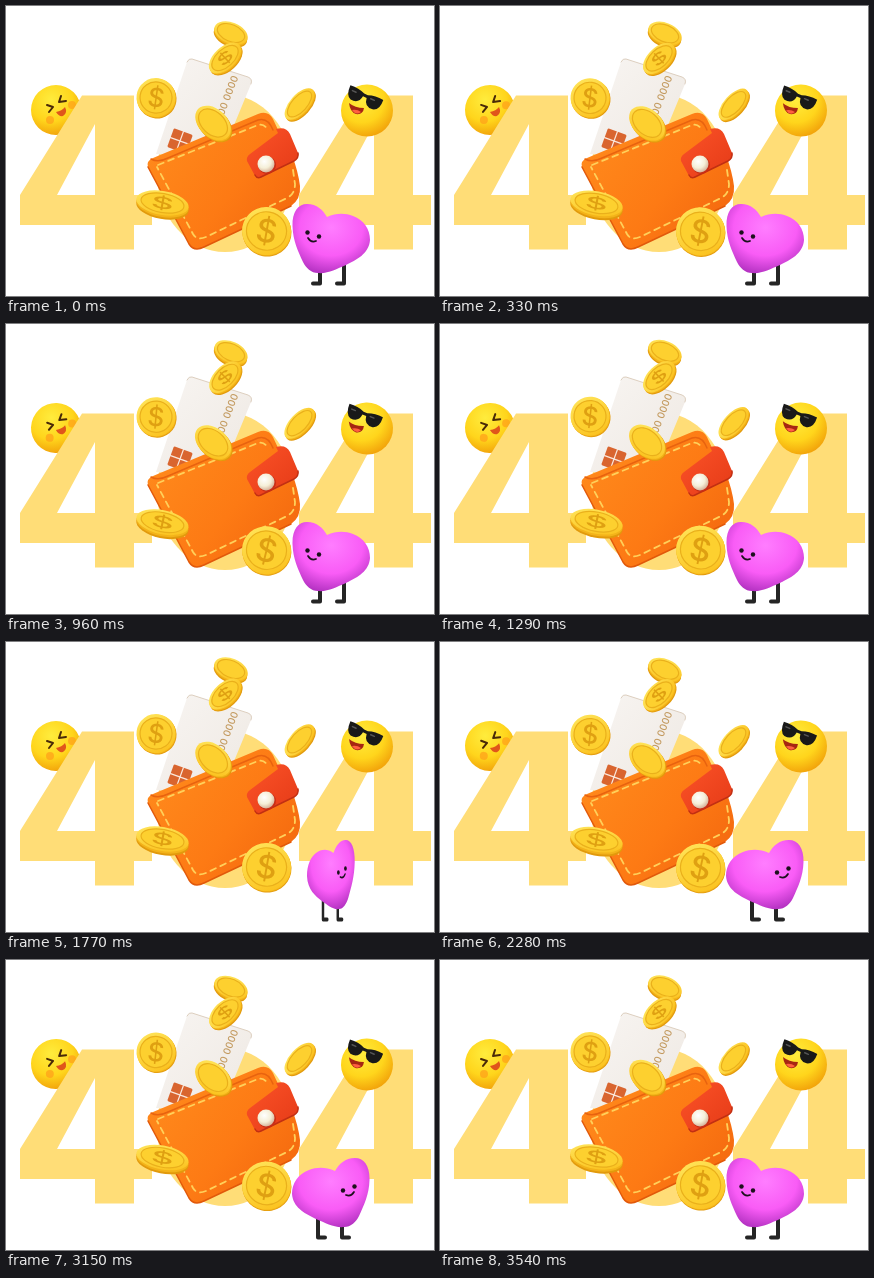
Animation of 428x290 px, one loop 3.57 s. Source, as an HTML page:

```html
<!DOCTYPE html>
<html lang="en">
<head>
<meta charset="utf-8">
<title>404</title>
<style>
html, body { margin: 0; width: 100%; height: 100%; overflow: hidden; background: #fff; }
svg { display: block; width: 428px; height: 290px; }
text { font-family: Inter, Arial, sans-serif; }
</style>
</head>
<body>
<svg viewBox="0 0 428 290" fill="none" stroke-linecap="round" stroke-linejoin="round">
  <defs>
    <radialGradient id="skin" cx=".4" cy=".3" r=".72">
      <stop offset="0" stop-color="#ffec3d"/><stop offset=".6" stop-color="#ffd51c"/><stop offset="1" stop-color="#f2a30a"/>
    </radialGradient>
    <linearGradient id="gold" x1=".1" y1="0" x2=".8" y2="1">
      <stop offset="0" stop-color="#ffe65c"/><stop offset="1" stop-color="#fbc11d"/>
    </linearGradient>
    <linearGradient id="leather" x1="0" y1=".2" x2="1" y2=".9">
      <stop offset="0" stop-color="#ff8a1c"/><stop offset=".55" stop-color="#fd7a14"/><stop offset="1" stop-color="#f2660e"/>
    </linearGradient>
    <linearGradient id="strap" x1="0" y1="0" x2="1" y2="1">
      <stop offset="0" stop-color="#fb5328"/><stop offset="1" stop-color="#e53a17"/>
    </linearGradient>
    <linearGradient id="card" x1="0" y1="0" x2="1" y2="1">
      <stop offset="0" stop-color="#f8f5f2"/><stop offset="1" stop-color="#eee8e2"/>
    </linearGradient>
    <radialGradient id="pink" cx=".5" cy=".34" r=".68">
      <stop offset="0" stop-color="#ff7dff"/><stop offset=".6" stop-color="#f95cf6"/><stop offset="1" stop-color="#b432c2"/>
    </radialGradient>
    <radialGradient id="pearl" cx=".4" cy=".35" r=".65">
      <stop offset="0" stop-color="#fff"/><stop offset=".6" stop-color="#f5efd8"/><stop offset="1" stop-color="#d7b59d"/>
    </radialGradient>
    <path id="four" d="M76 89.5H128V189H146V219H128V243.5H89V219H14V189ZM89 118L51 189H89Z" fill-rule="evenodd"/>
  </defs>

  <g class="sway" data-at="50 104" data-turn="2">
    <circle cx="50" cy="104" r="25" fill="url(#skin)"/>
    <g fill="#ffa21a" opacity=".75"><circle cx="44" cy="114" r="4"/><circle cx="66" cy="99" r="4"/></g>
    <path d="M41 99L47 101L43 106M55 90L53 96L60 95" stroke="#4a2a08" stroke-width="2"/>
    <path d="M50 106Q56 105 59 101Q62 107 57 110Q53 111 50 106Z" fill="#e0561b"/>
  </g>

  <g fill="#ffdd77">
    <use href="#four"/>
    <use href="#four" x="279"/>
    <ellipse cx="219" cy="167" rx="68" ry="79"/>
  </g>

  <g class="sway" data-at="361 105" data-turn="-2">
    <circle cx="361" cy="104.5" r="26" fill="url(#skin)"/>
    <path d="M343 97Q349 102 358 102Q357 109 350 108Q344 106 343 97Z" fill="#a62612"/>
    <path d="M346 104Q351 103 355 106Q350 110 346 104Z" fill="#ff6040"/>
    <g transform="translate(358 93) rotate(24)">
      <path d="M-18-7Q-9-8-2-5H2Q9-8 18-7Q19 4 12 6Q3 7 2-2H-2Q-3 7-12 6Q-18 4-18-7Z" fill="#191919"/>
      <path d="M-14-3H-10M6-3H10" stroke="#555" stroke-width="1.5"/>
    </g>
  </g>

  <!-- card and wallet -->
  <path d="M186 53L242 71Q247 73 245 78L214 153L150 148L181 56Q183 52 186 53Z" fill="url(#card)"/>
  <path d="M181 56Q183 52 186 53L242 71Q247 73 245 78" stroke="#ddcfbf"/>
  <g transform="translate(174 135) rotate(20)">
    <rect x="-10" y="-10" width="20" height="20" rx="1.5" fill="#d9652f"/>
    <path d="M0-10V10M-10 0H10" stroke="#fae7db" stroke-width="1.3"/>
  </g>
  <text transform="translate(213 122) rotate(-69)" font-size="10" font-weight="500" fill="#c39a5f">0000 0000</text>
  <path d="M147 152L252 108Q262 104 267 113L273 126Q290 150 294 180Q295 193 285 200L198 241Q188 246 183 238L142 161Q140 155 147 152Z" fill="url(#leather)"/>
  <path d="M142 161L183 238Q188 246 198 241L285 200" stroke="#e2590a" stroke-width="1.5"/>
  <path d="M145 153Q152 157 162 152L252 114Q262 111 267 124" stroke="#e8630f" stroke-width="1.5"/>
  <path d="M152 159L252 119Q259 117 262 125M287 164L289 178Q289 188 281 192L200 231Q191 235 187 228L151 161" stroke="#ffd05a" stroke-width="1.8" stroke-dasharray="6 5"/>
  <path d="M244 148L272 127L270 123Q280 120 284 128L292 147Q293 152 288 155L255 171Q250 173 248 168L241 155Q240 151 244 148Z" fill="url(#strap)"/>
  <path d="M249 169Q251 173 255 171L288 155Q293 152 292 147" stroke="#c22f12" stroke-width="1.5"/>
  <circle cx="261" cy="159" r="9" fill="#c92e16"/>
  <circle cx="260" cy="158" r="8.5" fill="url(#pearl)"/>

  <g id="coins"></g>

  <g id="heart">
    <path d="M314 260V277.5H307M338 256V277.5H331" stroke="#252525" stroke-width="4"/>
    <path d="M312 267C305 267 300 262 297 256C292 245 287 235 286.5 220C286 206 292 198 301 198C311 198 317 204 321 211C330 207 339 207 347 210C358 214 364 223 364 234C363 248 350 254 340 259C330 263 322 268 312 267Z" fill="url(#pink)"/>
    <g fill="#1c101c"><circle cx="301.5" cy="226.5" r="2.2"/><circle cx="313" cy="230.5" r="2.2"/></g>
    <path d="M302 232Q305 237 310 235" stroke="#1c101c" stroke-width="1.7"/>
  </g>
</svg>
<script>
const LOOP = 3570, SWAY = LOOP / 2, FLIP = 180, FLIP_AWAY = 1643, FLIP_BACK = 3300;

// x, y, rx, ry, tilt, rim dx, rim dy, sign, sway degrees
const coins = [
  [225, 27, 17.5, 10.5, 22, -.5, 3, 0, 2],
  [219, 52, 19.5, 11, -43, 1.5, 2, 1, -2],
  [150, 91.5, 19.5, 19.5, 8, 1, 1.5, 1, -3],
  [207, 117, 20.5, 14, 43, 1.5, 2, 0, -3],
  [293.5, 98, 19.5, 9.5, -48, 1.5, 2, 0, 2],
  [156.5, 197, 26.5, 12, 10, 0, 4, 1, 2],
  [260.5, 225, 24.5, 24, 10, .5, 1.5, 1, 4],
];

function coin([x, y, rx, ry, tilt, dx, dy, sign, turn]) {
  const spin = `rotate(${tilt})`;
  const label = sign ? `<text transform="${spin} scale(${rx / 18} ${ry / 18})" y="8.5" text-anchor="middle"
    font-size="24" font-weight="500" fill="#dfa012">$</text>` : '';
  return `<g class="sway" data-at="${x} ${y}" data-turn="${turn}" data-bob="1.2"><g transform="translate(${x} ${y})">
    <ellipse rx="${rx}" ry="${ry}" transform="translate(${dx} ${dy}) ${spin}" fill="#e29a0c"/>
    <ellipse rx="${rx}" ry="${ry}" transform="translate(${dx / 2} ${dy / 2}) ${spin}" fill="#f3b31a"/>
    <ellipse rx="${rx}" ry="${ry}" transform="${spin}" fill="url(#gold)"/>
    <ellipse rx="${rx * .82}" ry="${ry * .8}" transform="${spin}" fill="#fdd02f" stroke="#eab01b" stroke-width="1.2"/>
    ${label}</g></g>`;
}

document.getElementById('coins').innerHTML = coins.map(coin).join('');
const heart = document.getElementById('heart');
const swaying = [...document.querySelectorAll('.sway')];
const progress = (t, start) => Math.min(1, Math.max(0, (t - start) / FLIP));

function draw(now) {
  const t = now % LOOP;
  const sway = (1 - Math.cos(2 * Math.PI * t / SWAY)) / 2;
  for (const el of swaying) {
    const { at, turn, bob = 0 } = el.dataset;
    el.setAttribute('transform', `translate(0 ${bob * sway}) rotate(${turn * sway} ${at})`);
  }
  const turned = progress(t, FLIP_AWAY) - progress(t, FLIP_BACK);
  heart.setAttribute('transform', `translate(325 0) scale(${Math.cos(Math.PI * turned)} 1) translate(-325 0)`);
}

function tick() {
  draw(performance.now());
  requestAnimationFrame(tick);
}
tick();
</script>
</body>
</html>
```
